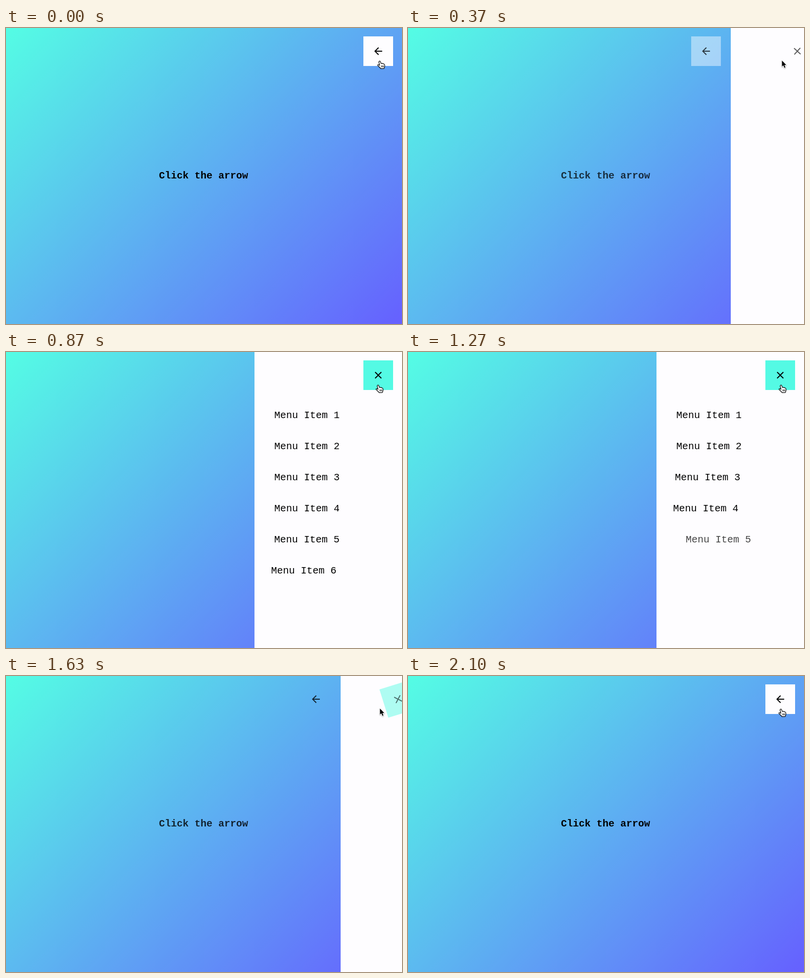
An HTML page with a canvas that plays this animation: 800 by 600 pixels, repeating every 2130 ms.

```html
<!DOCTYPE html>
<html lang="en">
<head>
<meta charset="utf-8">
<title>Slide menu</title>
<style>
  html, body { margin: 0; width: 100%; height: 100%; overflow: hidden; background: #5db0f1; }
  canvas { display: block; width: 800px; height: 600px; }
</style>
</head>
<body>
<canvas id="stage" width="800" height="600"></canvas>
<script>
const ctx = document.getElementById('stage').getContext('2d');
const LOOP = 2130;
const WHITE = '#fefdff', CYAN = '#54fae4';
const FONT = '20px "Liberation Mono", "Courier New", monospace';

// 24px icons
const ARROW = new Path2D('M20 11H7.83l5.59-5.59L12 4l-8 8 8 8 1.41-1.41L7.83 13H20z');
const CROSS = new Path2D('M19 6.41L17.59 5 12 10.59 6.41 5 5 6.41 10.59 12 5 17.59 6.41 19 12 13.41 17.59 19 19 17.59 13.41 12z');
const HAND = new Path2D('M3 3.2C2.8 1 5.2 .2 6 2.1L7.4 6Q9 5 10 6.2Q11.3 5.5 12.2 6.8Q13.8 6.5 14.3 8L14.8 10.5C15 12.5 14 13.5 13.4 16L6.6 16.2C5.5 14 3.5 12.8 2.2 11.6C.4 9.8 .2 8.8 1.2 8.4C2.3 8 3.4 8.8 4.6 9.8Z');
const CREASES = new Path2D('M8.3 10v3.4M10.3 10v3.4M12.3 10v3.4');
const POINTER = new Path2D('M0 0V12.2L2.8 9.6 5 14.8 7 14 4.9 8.9H8.6Z');

const gradient = ctx.createLinearGradient(50, -50, 750, 650);
gradient.addColorStop(0, '#54fde4');
gradient.addColorStop(1, '#6660ff');

const clamp = v => Math.max(0, Math.min(1, v));
const ramp = (t, from, length) => clamp((t - from) / length);
const quadOut = u => 1 - (1 - u) ** 2;
const backOut = u => 1 + 2.70158 * (u - 1) ** 3 + 1.70158 * (u - 1) ** 2;

function put(x, y, draw, alpha = 1, angle = 0) {
  ctx.save();
  ctx.globalAlpha *= alpha;
  ctx.translate(x, y);
  ctx.rotate(angle * Math.PI / 180);
  draw();
  ctx.restore();
}

function button(x, icon, color, hover, alpha, angle) {
  if (alpha <= 0) return;
  put(x, 47, () => {
    put(0, 0, () => {
      ctx.fillStyle = color;
      ctx.fillRect(-30, -30, 60, 60);
    }, hover);
    ctx.translate(-12, -12);
    ctx.fillStyle = '#000';
    ctx.fill(icon);
  }, alpha, angle);
}

function label(text, x, y, alpha, weight = '') {
  if (alpha <= 0) return;
  ctx.font = weight + FONT;
  put(x, y, () => {
    ctx.fillStyle = '#000';
    ctx.fillText(text, 0, 0);
  }, alpha);
}

const track = [[0, 755.3], [370, 755], [630, 753], [870, 752], [1270, 754], [1630, 755], [2130, 753.6]];

function cursorX(t) {
  const i = track.findIndex(k => k[0] > t);
  const [a, x] = track[i - 1], [b, end] = track[i];
  return x + (end - x) * (t - a) / (b - a);
}

function cursor(t) {
  const plain = (t > 280 && t < 396) || (t > 1592 && t < 1708);
  const x = cursorX(t);
  ctx.lineJoin = 'round';
  ctx.shadowColor = 'rgba(0,0,0,.3)';
  ctx.shadowBlur = 2;
  ctx.shadowOffsetY = 1;
  if (plain) {
    put(x + .5, 66, () => {
      ctx.strokeStyle = '#fff';
      ctx.lineWidth = 2;
      ctx.stroke(POINTER);
      ctx.shadowColor = 'transparent';
      ctx.fillStyle = '#000';
      ctx.fill(POINTER);
    });
  } else {
    put(x - 5, 66, () => {
      ctx.fillStyle = '#fff';
      ctx.fill(HAND);
      ctx.shadowColor = 'transparent';
      ctx.strokeStyle = '#000';
      ctx.lineWidth = 1.2;
      ctx.stroke(HAND);
      ctx.lineWidth = 1;
      ctx.stroke(CREASES);
    });
  }
  ctx.shadowColor = 'transparent';
}

function draw(t) {
  // the menu timeline runs forward, then back
  const T = Math.min(t, 718 - 1.0206 * (t - 1270));
  const open = quadOut(ramp(T, 265.5, 357));
  const left = 802 - 300 * open;
  const fade = 1 - ramp(T, 290, 310);

  ctx.fillStyle = gradient;
  ctx.fillRect(0, 0, 800, 600);
  label('Click the arrow', 309, 305, fade, 'bold ');

  const arrowHover = Math.max(1 - ramp(t, 280, 230), ramp(t, 1708, 230));
  button(752 - 300 * open, ARROW, WHITE, arrowHover, fade, 0);

  ctx.fillStyle = WHITE;
  ctx.fillRect(left, 0, 300, 600);
  for (let i = 0; i < 6; i++) {
    const p = backOut(ramp(T, 428 + 61.8 * i, 204));
    label('Menu Item ' + (i + 1), left + 40 + 70 * (1 - p), 134 + 63 * i, clamp(p));
  }

  const crossHover = Math.min(ramp(t, 396, 230), 1 - ramp(t, 1592, 230));
  button(752 + 69 * (1 - open), CROSS, CYAN, crossHover, open ** .65, -185 * (1 - open));
  cursor(t);
}

const began = performance.now();

function tick() {
  const t = Math.max(0, performance.now() - began) % LOOP;
  // thirty pictures a second, on a 10 ms clock
  const step = Math.floor((3 * Math.floor(t / 10) + 1) / 10);
  draw(10 * Math.round(10 * step / 3));
  requestAnimationFrame(tick);
}
tick();
</script>
</body>
</html>
```
